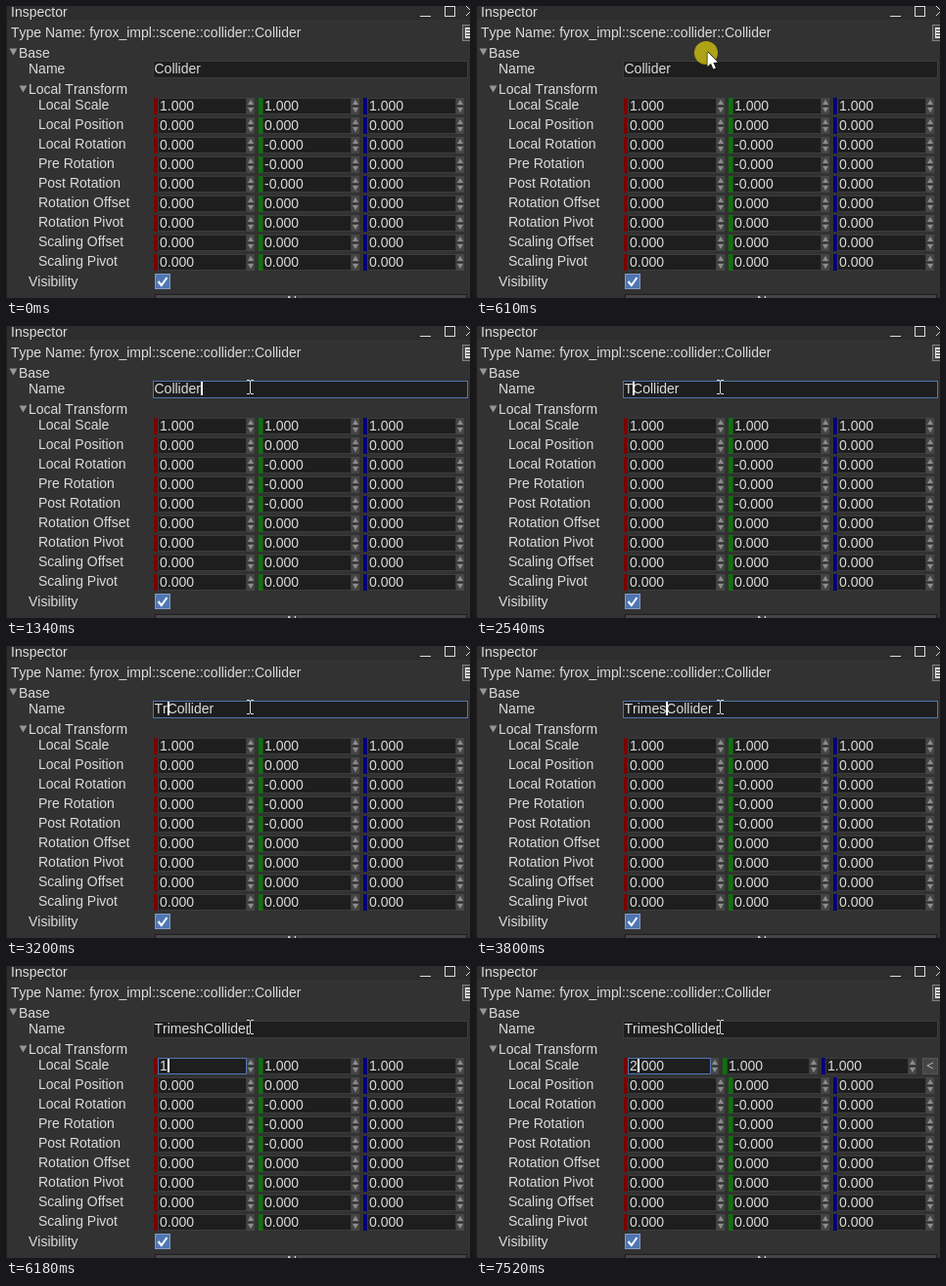
An HTML page with a canvas for the animation above (8 s loop, 474x299 px).

```html
<!DOCTYPE html>
<html lang="en">
<head>
<meta charset="utf-8">
<title>Inspector</title>
<style>
html, body { margin: 0; width: 100%; height: 100%; overflow: hidden; background: #323232; }
canvas { display: block; }
</style>
</head>
<body>
<canvas id="stage" width="474" height="299"></canvas>
<script>
const ctx = document.getElementById('stage').getContext('2d');
const LOOP = 8000;
const FG = '#dcdcdc', PANEL = '#323232', FIELD = '#1e1e1e', EDGE = '#3c3c3c';
const BUTTON = '#464646', BLUE = '#5076b2', ARROW = '#8c8c8c';
const AXES = ['#780000', '#007800', '#000078'];

const ROWS = [
  ['Local Scale', '1.000', '1.000', '1.000'],
  ['Local Position', '0.000', '0.000', '0.000'],
  ['Local Rotation', '0.000', '-0.000', '0.000'],
  ['Pre Rotation', '0.000', '-0.000', '0.000'],
  ['Post Rotation', '0.000', '-0.000', '0.000'],
  ['Rotation Offset', '0.000', '0.000', '0.000'],
  ['Rotation Pivot', '0.000', '0.000', '0.000'],
  ['Scaling Offset', '0.000', '0.000', '0.000'],
  ['Scaling Pivot', '0.000', '0.000', '0.000']
];

// Typed text: [time, text before the caret]
const NAME = [[0, ''], [2540, 'T'], [2670, 'Te'], [3070, 'T'], [3200, 'Tr'], [3270, 'Tri'],
  [3470, 'Trim'], [3540, 'Trime'], [3800, 'Trimes'], [4790, 'Trimesh']];
const SCALE = [[0, '1.000'], [6180, '1'], [6390, '10'], [6920, '1'], [7050, ''], [7120, '2']];
const FOCUS_NAME = 1200, HOME = 2000, FOCUS_SCALE = 4920, COMMIT = 7520;

// Pointer: [time, x, y]
const PATH = [[70, 346, 241], [130, 285, 150], [200, 236, 82], [270, 211, 40],
  [410, 213, 41], [480, 219, 43], [540, 227, 46], [610, 235, 48], [670, 239, 50],
  [740, 243, 52], [810, 246, 58], [870, 248, 60], [1000, 249.5, 62]];
const BEAM = 810, PRESS = 1140, RELEASE = 1340;

function last(list, t) {
  let hit = null;
  for (const item of list) if (item[0] <= t) hit = item;
  return hit;
}

function rect(x, y, w, h, color) {
  ctx.fillStyle = color;
  ctx.fillRect(x, y, w, h);
}

function frame(x, y, w, h, color) {
  ctx.strokeStyle = color;
  ctx.lineWidth = 1;
  ctx.strokeRect(x + 0.5, y + 0.5, w - 1, h - 1);
}

function text(s, x, y, color = FG) {
  ctx.fillStyle = color;
  ctx.fillText(s, x, y);
}

function poly(points, color) {
  ctx.beginPath();
  points.forEach(([x, y]) => ctx.lineTo(x, y));
  ctx.closePath();
  ctx.fillStyle = color;
  ctx.fill();
}

function line(points, color, width) {
  ctx.beginPath();
  points.forEach(([x, y]) => ctx.lineTo(x, y));
  ctx.strokeStyle = color;
  ctx.lineWidth = width;
  ctx.stroke();
}

function triangle(x, y, w, h, color) {
  poly([[x - w / 2, y - h / 2], [x + w / 2, y - h / 2], [x, y + h / 2]], color);
}

function caret(x, y, before) {
  rect(Math.round(x + ctx.measureText(before).width), y, 2, 14, '#ffffff');
}

function field(x, y, w, h, focused) {
  rect(x, y, w, h, FIELD);
  frame(x, y, w, h, focused ? BLUE : EDGE);
}

function header() {
  rect(0, 0, 474, 14, '#2d2d2d');
  rect(0, 0, 1, 299, '#1e1e1e');
  text('Inspector', 5, 11);
  rect(423, 10, 11, 1, FG);
  frame(448, 0, 11, 11, FG);
  line([[470, 0], [480, 10]], FG, 1);
  line([[470, 10], [480, 0]], FG, 1);
  text('Type Name: fyrox_impl::scene::collider::Collider', 5, 32);
  rect(466, 19, 8, 17, BUTTON);
  frame(466, 19, 12, 17, '#828282');
  rect(469, 22, 5, 11, FG);
  for (let y = 24; y < 32; y += 3) rect(470, y, 4, 1, BUTTON);
}

function labels() {
  triangle(7.5, 47, 8, 7, '#969696');
  text('Base', 13, 53);
  text('Name', 23, 69);
  triangle(17.5, 85, 8, 7, '#969696');
  text('Local Transform', 23, 90);
  text('Visibility', 23, 287);
}

function nameField(t) {
  const focused = t >= FOCUS_NAME && t < FOCUS_SCALE;
  const typed = last(NAME, t)[1];
  field(150, 56, 322, 18, focused);
  text(typed + 'Collider', 151.5, 69);
  if (focused) caret(151.5, 57, t < HOME ? 'Collider' : typed);
}

function spinner(x, y) {
  rect(x, y, 8, 8, BUTTON);
  rect(x, y + 9, 8, 8, BUTTON);
  triangle(x + 4, y + 4.5, 6, -5, ARROW);
  triangle(x + 4, y + 12.5, 6, 5, ARROW);
}

function scaleText(t, x, y) {
  const typed = last(SCALE, t)[1];
  if (t < 6180) rect(157, 95, 35, 14, BLUE);
  text(typed + (t >= COMMIT ? '.000' : ''), x, y);
  caret(x, 95, typed);
}

function vectorRow(row, i, t) {
  const y = 93 + i * 20;
  const narrow = i === 0 && t >= COMMIT;
  const pitch = narrow ? 101 : 107;
  text(row[0], 33, y + 13);
  for (let k = 0; k < 3; k++) {
    const x = 151 + k * pitch;
    const editing = i === 0 && k === 0 && t >= FOCUS_SCALE;
    rect(x, y + 1, 4, 17, AXES[k]);
    field(x + 4, y + 1, pitch - 16, 17, editing);
    spinner(x + pitch - 12, y + 1);
    if (editing) scaleText(t, x + 6, y + 14);
    else text(row[k + 1], x + 6, y + 14);
  }
  if (narrow) {
    rect(456, y + 1, 16, 17, BUTTON);
    frame(456, y + 1, 16, 17, '#555555');
    line([[467, 99], [461, 102], [467, 105]], '#b4b4b4', 1);
  }
}

function footer() {
  rect(152, 274, 16, 16, BLUE);
  frame(152, 274, 16, 16, '#8299c0');
  line([[155.5, 282], [158.8, 286], [164.5, 278]], '#ffffff', 2);
  rect(152, 295, 319, 4, BUTTON);
  frame(152, 295, 319, 10, '#1e1e1e');
  text('None', 287, 307);
}

function halo(x, y, r) {
  ctx.beginPath();
  ctx.arc(x, y, r, 0, Math.PI * 2);
  ctx.fillStyle = 'rgba(255, 238, 0, 0.6)';
  ctx.fill();
}

function arrow(x, y) {
  const shape = [[0, 0], [0, 15], [3.4, 11.8], [6, 17.5], [8.4, 16.4], [5.9, 10.9], [10.4, 10.6]]
    .map(([dx, dy]) => [x + dx, y + dy]);
  line([...shape, shape[0]], '#141414', 1.4);
  poly(shape, '#ffffff');
}

function beam(x, y) {
  const cx = Math.round(x), top = Math.round(y) - 7;
  for (const edge of [top, top + 14]) {
    rect(cx - 3, edge, 3, 1, FG);
    rect(cx + 1, edge, 3, 1, FG);
  }
  rect(cx, top + 1, 1, 13, FG);
}

function pointer(t) {
  const at = last(PATH, t);
  if (!at) return;
  const [, x, y] = at;
  if (t < BEAM) {
    halo(x, y, 12);
    arrow(x + 1.5, y - 1);
  } else {
    if (t >= PRESS && t < RELEASE) halo(x, y, 12.5);
    beam(x - 0.5, y);
  }
}

function draw(t) {
  ctx.font = '14px "Liberation Sans", Arial, sans-serif';
  ctx.fontKerning = 'none';
  rect(0, 0, 474, 299, PANEL);
  header();
  labels();
  nameField(t);
  ROWS.forEach((row, i) => vectorRow(row, i, t));
  footer();
  pointer(t);
}

const start = performance.now();
function tick() {
  draw((performance.now() - start) % LOOP);
  requestAnimationFrame(tick);
}
tick();
</script>
</body>
</html>
```
